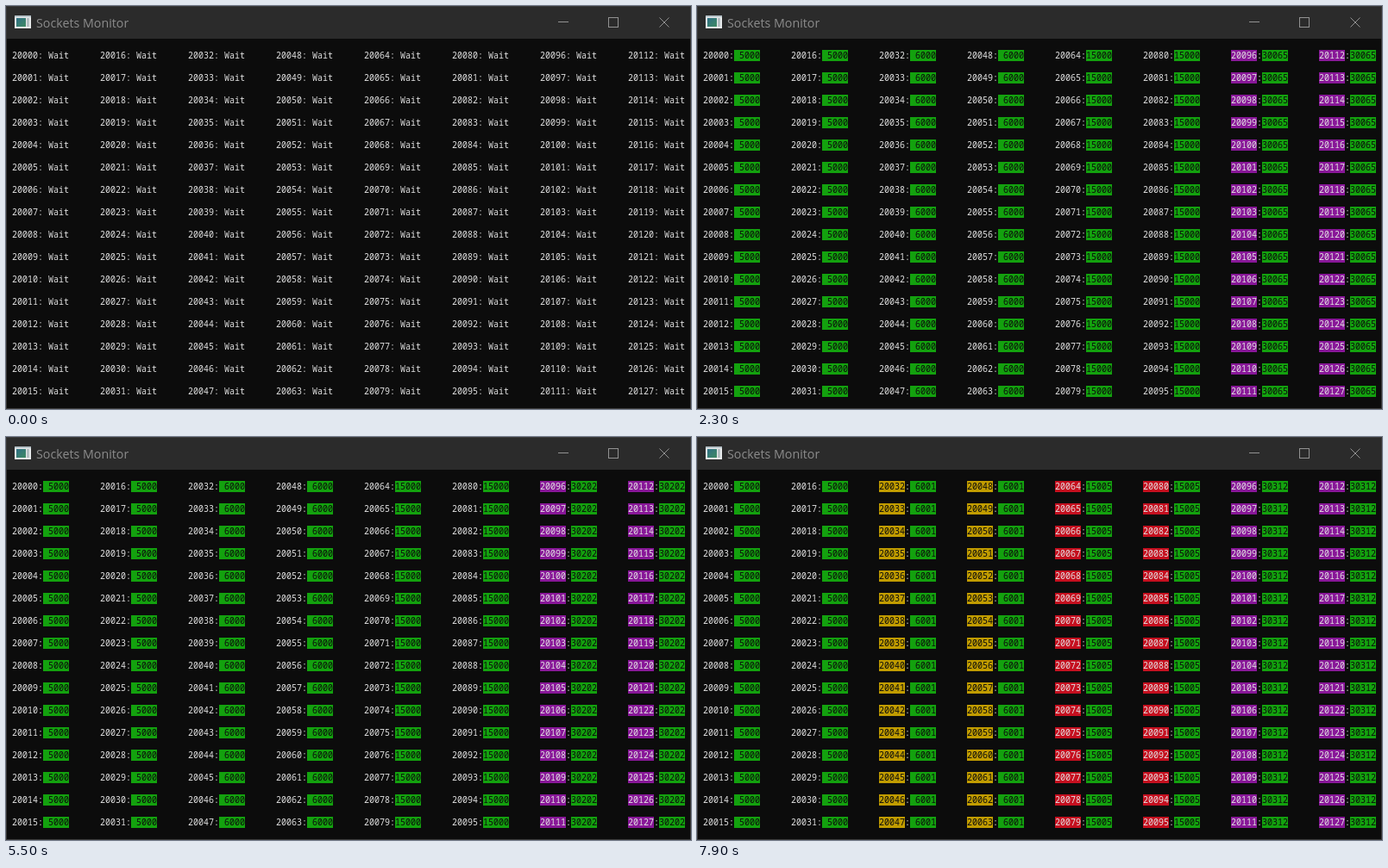
Animation of 794 by 468 pixels, one loop 8000 ms. Source, as an HTML page:

```html
<!DOCTYPE html>
<html lang="en">
<head>
<meta charset="utf-8">
<title>Sockets Monitor</title>
<style>
html, body { margin: 0; width: 100%; height: 100%; overflow: hidden; background: #0c0c0c; }
svg { display: block; width: 794px; height: 468px; }
.title { font: 14.25px "Open Sans", "Noto Sans", sans-serif; fill: #8c8c8c; }
#grid text { font: 500 10px "Noto Sans Mono", "DejaVu Sans Mono", monospace; fill: #e2e2e2; }
#grid rect { fill: none; shape-rendering: crispEdges; }
#grid .live .cell { fill: #13a10e; }
#grid .live .num { fill: #0c0c0c; }
#grid .slight .tag { fill: #c19c00; }
#grid .slight .port { fill: #0c0c0c; }
#grid .late .tag { fill: #c50f1f; }
#grid .lost .tag { fill: #881798; }
.controls { fill: none; stroke: #929292; }
</style>
</head>
<body>
<svg viewBox="0 0 794 468">
  <defs>
    <linearGradient id="pane" x2="1" y2="1">
      <stop offset="0" stop-color="#2f6f86"/>
      <stop offset="1" stop-color="#3f8a62"/>
    </linearGradient>
  </defs>
  <rect width="794" height="468" fill="#0c0c0c"/>
  <rect width="794" height="38" fill="#2b2b2b"/>
  <path d="M.5 468V.5H793.5V468M0 467.5H794" fill="none" stroke="#3a3a3a"/>
  <g shape-rendering="crispEdges">
    <rect x="10" y="11" width="19" height="15" fill="#e9eced"/>
    <rect x="10" y="11" width="19" height="2" fill="#b9c4ca"/>
    <rect x="12" y="14" width="11" height="10" fill="url(#pane)"/>
    <rect x="24" y="14" width="3" height="10" fill="#b5bfc3"/>
  </g>
  <text class="title" x="35" y="25">Sockets Monitor</text>
  <g class="controls">
    <path d="M640 18.5H652M698.5 13.5H709.5V24.5H698.5Z" shape-rendering="crispEdges"/>
    <path d="M757.5 13.5L768.5 24.5M768.5 13.5L757.5 24.5"/>
  </g>
  <g id="grid"></g>
</svg>
<script>
const LOOP = 8000, TICK = 100, ROWS = 16, COLS = 8;
const grid = document.getElementById('grid');

// Timer groups, two columns each: nominal period and [time, measured period] points.
const groups = [
  { period: 5000, points: [[500, 5000]] },
  { period: 6000, points: [[500, 6000], [5799, 6000], [5800, 6001]] },
  { period: 15000, points: [[600, 15000], [5799, 15000], [5800, 15005]] },
  { period: 30000, points: [[700, 30000], [800, 30000], [900, 30003], [2300, 30065],
    [3500, 30121], [4500, 30159], [6300, 30236], [7900, 30312]] }
];

function add(parent, name, attrs, text) {
  const el = document.createElementNS('http://www.w3.org/2000/svg', name);
  for (const key in attrs) el.setAttribute(key, attrs[key]);
  if (text) el.textContent = text;
  return parent.appendChild(el);
}

function buildColumn(col) {
  const x = 7 + col * 102;
  const node = add(grid, 'g', {});
  const nums = [];
  for (let row = 0; row < ROWS; row++) {
    const y = 51 + row * 26;
    const port = 20000 + col * ROWS + row;
    add(node, 'rect', { class: 'tag', x, y, width: 30, height: 13 });
    add(node, 'rect', { class: 'cell', x: x + 36, y, width: 30, height: 13 });
    add(node, 'text', { class: 'port', x, y: y + 10 }, String(port));
    add(node, 'text', { x: x + 30, y: y + 10 }, ':');
    nums.push(add(node, 'text', { class: 'num', x: x + 66, y: y + 10, 'text-anchor': 'end' }, 'Wait'));
  }
  return { node, nums, group: groups[col >> 1], shown: 'Wait' };
}

function measure(points, t) {
  if (t < points[0][0]) return null;
  for (let i = 1; i < points.length; i++) {
    const [t0, v0] = points[i - 1], [t1, v1] = points[i];
    if (t < t1) return Math.round(v0 + (v1 - v0) * (t - t0) / (t1 - t0));
  }
  return points[points.length - 1][1];
}

function status(drift) {
  if (drift > 10) return 'live lost';
  if (drift > 2) return 'live late';
  return drift > 0 ? 'live slight' : 'live';
}

const columns = Array.from({ length: COLS }, (_, col) => buildColumn(col));
const start = performance.now();

function draw() {
  const now = Math.max(0, performance.now() - start) % LOOP;
  const t = Math.floor(now / TICK) * TICK;
  for (const column of columns) {
    const { period, points } = column.group;
    const value = measure(points, t);
    const text = value === null ? 'Wait' : String(value);
    if (text === column.shown) continue;
    column.shown = text;
    column.node.setAttribute('class', value === null ? '' : status(value - period));
    for (const num of column.nums) num.textContent = text;
  }
  requestAnimationFrame(draw);
}
draw();
</script>
</body>
</html>
```
